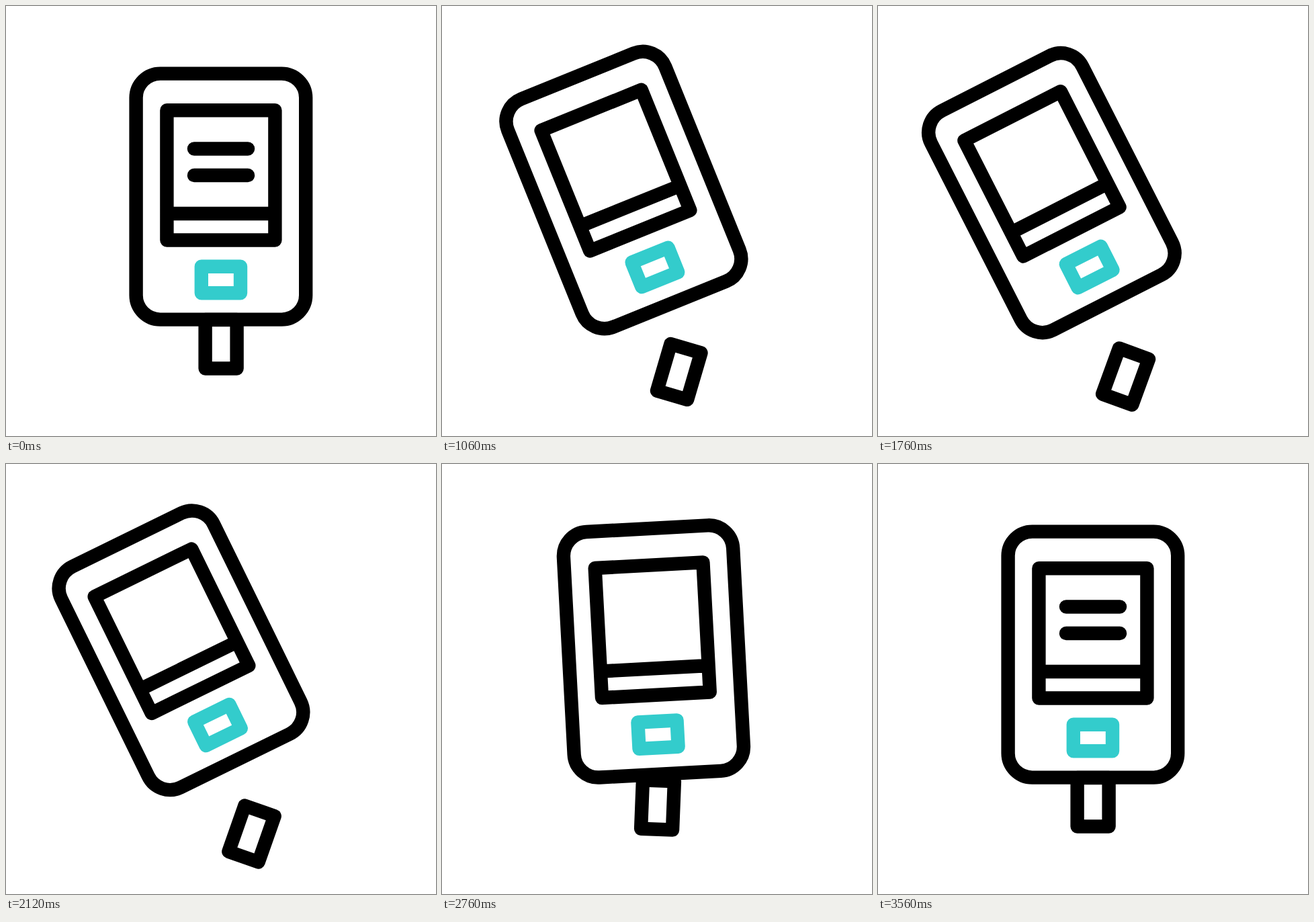
These frames come from a looping animation (640 by 640 pixels, 3600 ms). An HTML page:

```html
<!DOCTYPE html>
<html lang="en">
<head>
<meta charset="utf-8">
<title>Test meter</title>
<style>
  html, body { margin: 0; width: 100%; height: 100%; overflow: hidden; background: #fff; }
  svg { display: block; width: 100vw; height: 100vh; }
</style>
</head>
<body>
<svg viewBox="0 0 640 640" fill="none" stroke="#000" stroke-width="20.4" stroke-linecap="round" stroke-linejoin="round">
  <rect id="strip" x="296.6" y="467" width="47" height="72.5"/>
  <g id="meter">
    <rect x="193.6" y="100.6" width="252.6" height="366" rx="36"/>
    <path d="M239.4 155.2H400.4V348.5H239.4ZM239.4 309H400.4"/>
    <path id="line1"/>
    <path id="line2"/>
    <rect x="290.8" y="387.8" width="58.2" height="39.4" stroke="#33cccc"/>
  </g>
</svg>
<script>
const LOOP = 3600;
const $ = id => document.getElementById(id);
const strip = $('strip'), meter = $('meter');

const cubic = (a, b, c, d, s) => {
  const r = 1 - s;
  return a * r * r * r + 3 * b * r * r * s + 3 * c * r * s * s + d * s * s * s;
};

// Eases with level ends; x1 and x2 are the handle positions.
function ease(x, x1, x2) {
  if (x <= 0) return 0;
  if (x >= 1) return 1;
  let lo = 0, hi = 1;
  for (let i = 0; i < 30; i++) {
    const mid = (lo + hi) / 2;
    if (cubic(0, x1, x2, 1, mid) < x) lo = mid; else hi = mid;
  }
  return cubic(0, 0, 1, 1, lo);
}

const span = (t, from, to) => Math.min(1, Math.max(0, (t - from) / (to - from)));

const meterPath = u => [cubic(0, -7.4, -29.2, -45, u), cubic(0, -15.6, -15.8, -9.5, u)];
const stripPath = u => [cubic(0, 0.95, 16.7, 48.5, u), cubic(0, 10.8, 38.2, 48.25, u)];

function place(el, [dx, dy], angle, cx, cy) {
  el.setAttribute('transform',
    `translate(${cx + dx} ${cy + dy}) rotate(${angle}) translate(${-cx} ${-cy})`);
}

const lines = [
  { el: $('line1'), y: 212.5, out: 362, back: 3020 },
  { el: $('line2'), y: 252, out: 200, back: 3160 }
];

function drawLine({ el, y, out, back }, t) {
  const gone = span(t, out, out + 540) ** 2;
  const k = t < 1800 ? 1 - gone : ease(span(t, back, back + 400), 0.4, 0.6);
  el.setAttribute('d', k > 0 ? `M280 ${y}h${80 * k}` : '');
}

function draw(t) {
  const u = t < 1800
    ? ease(span(t, 200, 1800), 0.793, 0.058)
    : 1 - ease(span(t, 1804, 3412), 0.75, 0.059);
  place(meter, meterPath(u), -27 * u, 320, 320);
  place(strip, stripPath(u), 20 * u, 320, 503.25);
  lines.forEach(line => drawLine(line, t));
}

const start = performance.now();
function tick() {
  draw((performance.now() - start) % LOOP);
  requestAnimationFrame(tick);
}
draw(0);
requestAnimationFrame(tick);
</script>
</body>
</html>
```
